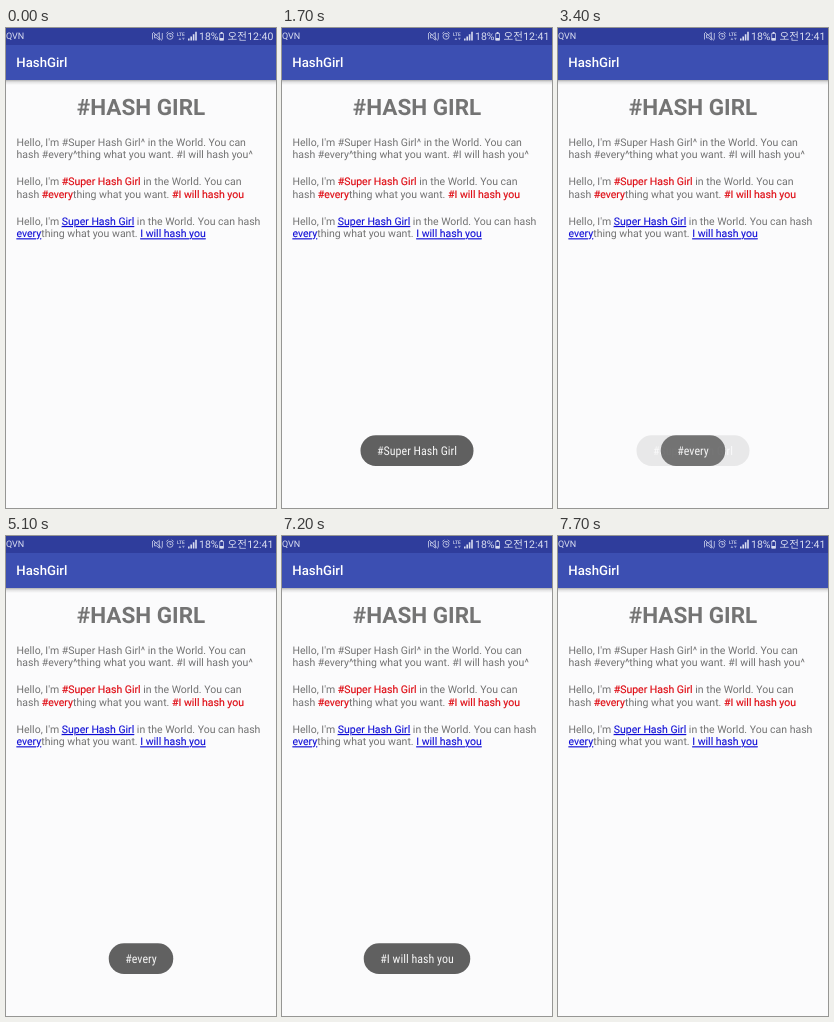
Recreate the animation shown at these times as an HTML page. Size 270x480 px, loop 8000 ms.

```html
<!DOCTYPE html>
<html lang="en">
<head>
<meta charset="utf-8">
<title>HashGirl</title>
<style>
  html, body { margin: 0; width: 100%; height: 100%; overflow: hidden; background: #fbfbfc; }
  svg { display: block; width: 270px; height: 480px; font-family: Roboto, "Noto Sans CJK KR", "Noto Sans CJK", sans-serif; }
  text { white-space: pre; text-rendering: geometricPrecision; }
  .body { font-size: 10.5px; fill: #727272; }
  .tag { fill: #de0810; stroke: #de0810; stroke-width: .15px; }
  .link { fill: #0d0bd6; stroke: #0d0bd6; stroke-width: .1px; text-decoration: underline; }
  .status { fill: #d9ddf0; }
  .line { fill: none; stroke: #d9ddf0; stroke-width: .75; }
  .toast rect { fill: #606060; }
  .toast text { fill: #f4f4f4; font-family: "Roboto Condensed", Roboto, sans-serif; font-stretch: 75%; font-size: 12px; text-anchor: middle; }
</style>
</head>
<body>
<svg viewBox="0 0 270 480">
  <defs>
    <linearGradient id="shade" x2="0" y2="1">
      <stop offset="0" stop-color="#000" stop-opacity=".3"/>
      <stop offset=".4" stop-color="#000" stop-opacity=".1"/>
      <stop offset="1" stop-color="#000" stop-opacity="0"/>
    </linearGradient>
  </defs>
  <rect width="270" height="480" fill="#fbfbfc"/>
  <rect y="52" width="270" height="5" fill="url(#shade)"/>
  <rect width="270" height="52" fill="#3c4fb2"/>
  <rect width="270" height="17" fill="#2f3d9c"/>

  <g class="status">
    <text x="0" y="11" font-size="9">QVN</text>
    <!-- muted speaker -->
    <path class="line" d="M146.500 5v6.500M156.300 5v6.500M148.500 6.800h2l2.800-2.300v7.600l-2.800-2.300h-2zM147 4l9 8.500"/>
    <!-- alarm clock -->
    <circle class="line" cx="164" cy="8.300" r="3"/>
    <path class="line" d="M164 6.500v2h1.500M160.300 5.500l2-1.700M167.700 5.500l-2-1.700"/>
    <text x="171" y="7.600" font-size="4.800" font-weight="500">LTE</text>
    <path d="M172.500 12l1.400-2.500 1.400 2.500zM176 9.700h2.800l-1.400 2.500z" opacity=".6"/>
    <path d="M182 10.500h1.600v2h-1.600zM184.400 8.500h1.600v4h-1.600zM186.800 6.200h1.600v6.300h-1.600zM189.200 3.800h1.600v8.700h-1.600z"/>
    <text x="193" y="12" font-size="10.500">18%</text>
    <path class="line" d="M213.700 5.500h3.800v6.700h-3.800z"/>
    <path d="M214.600 4h2v1.500h-2zM213.700 10h3.800v2.200h-3.800z"/>
    <text x="221.500" y="12" font-size="10.500">오전</text>
    <text id="clock" x="267.300" y="12" font-size="10.500" text-anchor="end">12:40</text>
  </g>

  <text x="10.300" y="39" font-size="13.200" font-weight="500" fill="#fff">HashGirl</text>
  <text x="135" y="86.700" font-size="22.500" font-weight="700" text-anchor="middle" fill="#747474">#HASH GIRL</text>

  <g class="body">
    <text x="10.500" y="117.500">Hello, I'm #Super Hash Girl^ in the World. You can</text>
    <text x="10.500" y="129.800">hash #every^thing what you want. #I will hash you^</text>
    <text x="10.500" y="157.300">Hello, I'm <tspan class="tag">#Super Hash Girl</tspan> in the World. You can</text>
    <text x="10.500" y="169.600">hash <tspan class="tag">#every</tspan>thing what you want. <tspan class="tag">#I will hash you</tspan></text>
    <text x="10.500" y="197">Hello, I'm <tspan class="link">Super Hash Girl</tspan> in the World. You can hash</text>
    <text x="10.500" y="209.300"><tspan class="link">every</tspan>thing what you want. <tspan class="link">I will hash you</tspan></text>
  </g>
  <g id="toasts"></g>
</svg>
<script>
  const LOOP = 8000, STEP = 100, FADE = 500;
  const NS = "http://www.w3.org/2000/svg";
  const clock = document.getElementById("clock");
  const layer = document.getElementById("toasts");

  function add(parent, name, attrs) {
    const el = document.createElementNS(NS, name);
    for (const key in attrs) el.setAttribute(key, attrs[key]);
    return parent.appendChild(el);
  }

  // label, pill width, start of fade in, start of fade out
  const toasts = [
    ["#Super Hash Girl", 113, 1120, 2930],
    ["#every", 64.5, 3090, 5050],
    ["#I will hash you", 106.5, 5200, 7170]
  ].map(([label, w, show, hide]) => {
    const el = add(layer, "g", { class: "toast" });
    add(el, "rect", { x: 135 - w / 2, y: 407.3, width: w, height: 30.7, rx: 15.3 });
    add(el, "text", { x: 135, y: 427.3 }).textContent = label;
    return { el, show, hide };
  });

  const part = (t, start) => Math.min(1, Math.max(0, (t - start) / FADE));

  function draw(now) {
    const t = Math.floor((now % LOOP) / STEP) * STEP;
    clock.textContent = t < 1000 ? "12:40" : "12:41";
    for (const { el, show, hide } of toasts) {
      const enter = 1 - (1 - part(t, show)) ** 2;
      const leave = 1 - part(t, hide) ** 2;
      el.setAttribute("opacity", enter * leave);
    }
  }

  const start = performance.now();
  function tick() {
    draw(performance.now() - start);
    requestAnimationFrame(tick);
  }
  tick();
</script>
</body>
</html>
```
